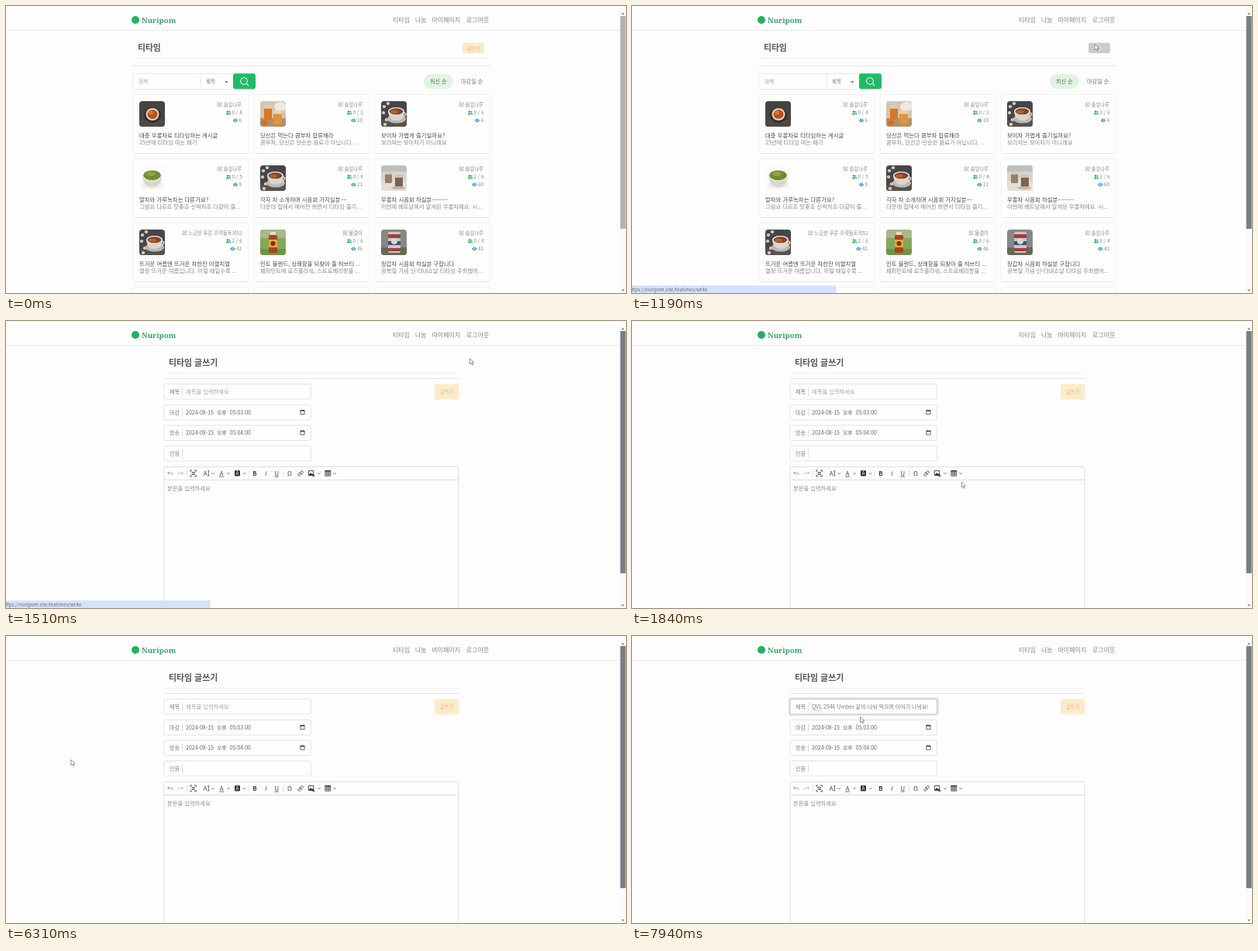
These frames come from a looping animation (800 by 371 pixels, 8000 ms). An HTML page:

```html
<!DOCTYPE html>
<html lang="ko">
<head>
<meta charset="utf-8">
<title>티타임</title>
<style>
html, body { margin: 0; width: 100%; height: 100%; overflow: hidden; background: #fdfdfd; }
svg { display: block; width: 100vw; height: 100vh; }
text { font-family: "Noto Sans CJK KR", "Noto Sans CJK", "Noto Sans", sans-serif; white-space: pre; }
.brand { font-family: "Noto Serif", serif; font-weight: 700; }
</style>
</head>
<body>
<svg id="stage" viewBox="0 0 800 371"></svg>
<script>
const LOOP = 8000;
const FONT = '"Noto Sans CJK KR", "Noto Sans CJK", "Noto Sans", sans-serif';
const pen = document.createElement('canvas').getContext('2d');

function widthOf(str, size) {
  pen.font = `${size * 10}px ${FONT}`;
  return pen.measureText(str).width / 10;
}
const text = (x, y, str, size, fill, extra = '') =>
  `<text x="${x}" y="${y}" font-size="${size}" fill="${fill}" ${extra}>${str}</text>`;
const rect = (x, y, w, h, fill, r = 0, extra = '') =>
  `<rect x="${x}" y="${y}" width="${w}" height="${h}" rx="${r}" fill="${fill}" ${extra}/>`;
const box = (x, y, w, h, r = 2, stroke = '#dedede') =>
  rect(x + .5, y + .5, w - 1, h - 1, '#fefefe', r, `stroke="${stroke}" stroke-width=".8"`);
const line = (d, stroke, width = .8, extra = '') =>
  `<path d="${d}" fill="none" stroke="${stroke}" stroke-width="${width}" ${extra}/>`;
const disc = (x, y, rx, ry, fill) => `<ellipse cx="${x}" cy="${y}" rx="${rx}" ry="${ry}" fill="${fill}"/>`;
const fill = (d, color) => `<path d="${d}" fill="${color}"/>`;
const at = (x, y, body, extra = '') => `<g transform="translate(${x} ${y})" ${extra}>${body}</g>`;

// Thumbnails, each 33 by 33
const daisies = [[4, 7], [9, 3], [3, 15], [7, 24], [5, 30]]
  .map(([x, y]) => disc(x, y, 2.2, 2, '#d9d6ca') + disc(x, y, .8, .8, '#d9b548')).join('');
const glass = (x, y, w, h, tone) =>
  rect(x, y, w, h, tone, 1.5) + rect(x, y, w, h * .25, '#efe4d6', 1, 'opacity=".75"');
const thumbs = {
  oolong: rect(0, 0, 33, 33, '#47433f') + rect(0, 24, 33, 9, '#4f4741') +
    disc(17, 18, 11, 10, '#30302f') + disc(17, 17, 8.5, 8, '#e2d8cd') +
    disc(17, 17, 6.6, 6.1, '#b9521f') + disc(15, 15, 3, 2.5, '#d8783d'),
  kombucha: rect(0, 0, 33, 33, '#d3c6b6') + rect(0, 22, 33, 11, '#b58e68') + disc(26, 7, 8, 6, '#eee9e1') +
    glass(5, 5, 10, 19, '#d57a22') + glass(17, 12, 11, 18, '#e0933a') + disc(6, 28, 4, 3, '#d66c1f'),
  cup: rect(0, 0, 33, 33, '#45464a') + rect(0, 25, 33, 8, '#55524f') + daisies +
    disc(20, 23, 12, 5.5, '#bdb9b3') + fill('M9 13Q10 25 20 25Q30 25 30 13Z', '#d9d5cf') +
    disc(19.5, 13, 10.5, 5, '#efebe5') + disc(19.5, 13.3, 8.9, 4, '#8a4222') +
    disc(17, 13.8, 5, 2, '#b4622f') + line('M29 15Q35 16 28 21', '#d5d0ca', 1.6),
  matcha: rect(0, 0, 33, 33, '#fbfbf9') + disc(17, 25, 14, 5, '#eeeeeb') +
    fill('M4 14Q6 28 17 28Q28 28 29 14Z', '#d5d8ca') + disc(16.5, 14, 12.5, 7, '#e3e6d9') +
    disc(16.5, 12.8, 11.3, 6.4, '#718d2b') + disc(15, 11, 6, 3, '#8da643'),
  latte: rect(0, 0, 33, 33, '#d6d4d0') + rect(0, 20, 33, 13, '#e3dfd9') + rect(0, 0, 33, 8, '#bfc0bb') +
    glass(5, 8, 9, 15, '#9a7f62') + glass(18, 12, 10, 16, '#7b634d') + disc(22, 29, 9, 2, '#c4b7a8'),
  bottle: rect(0, 0, 33, 33, '#83a858') + rect(0, 0, 33, 11, '#a9b889') + rect(0, 25, 33, 8, '#6e9547') +
    rect(13, 3, 7, 5, '#e8ddcb', 1) + rect(11, 7, 11, 23, '#a9441d', 2) +
    rect(11, 13, 11, 10, '#e5a63c') + disc(16.5, 18, 3, 3, '#793019'),
  pack: rect(0, 0, 33, 33, '#858983') + rect(0, 23, 33, 10, '#626956') + rect(9, 3, 16, 27, '#c9c8ca', 2) +
    rect(9, 6, 16, 5, '#a83c39') + rect(9, 15, 16, 5, '#3b5080') + rect(9, 24, 16, 4, '#a83c39') +
    disc(17, 15, 4, 4, '#ddd7d0')
};

// Small symbols, each about 6 by 6
const edit = line('M3.2 .8H.6V5.6H5.2V3.3M2.2 4L2.5 2.8L5 .3L5.9 1.2L3.4 3.7Z', '#888', .6);
const people = disc(2.2, 1.6, 1.3, 1.3, '#26a766') + disc(4.7, 1.8, 1, 1, '#26a766') +
  fill('M0 5.4Q0 3.3 2.2 3.3Q4.2 3.3 4.3 5.4ZM4.7 5.4Q4.7 4 4 3.4Q6.4 3 6.5 5.4Z', '#26a766');
const eye = fill('M0 3Q3.2 -1.6 6.4 3Q3.2 7.6 0 3Z', '#2f97e6') +
  disc(3.2, 3, 1.4, 1.4, '#fff') + disc(3.2, 3, .9, .9, '#2f97e6');
const calendar = line('M.4 1.2H5.6V6H.4ZM1.6 0V1M4.4 0V1', '#333', .7) + rect(.2, .9, 5.6, 1.2, '#333');
const chevron = x => line(`M${x - 1.7} 196.2l1.7 1.7l1.7 -1.7`, '#555', .8);

const WRITER = '솔잎나루';
const posts = [
  ['oolong', '대충 우롱차로 티타임하는 게시글', '25년에 티타임 여는 패기', '0 / 4', 6],
  ['kombucha', '당신은 먹는다 콤부차 합류해라', '콤부차, 당신은 단순한 음료가 아닙니다. ...', '0 / 2', 10],
  ['cup', '보이차 가볍게 즐기실까요?', '보리차는 보이차가 아니래요', '0 / 6', 4],
  ['matcha', '말차와 가루녹차는 다른가요?', '그럼요 다르죠 맛좋죠 신박하죠 다같이 즐...', '0 / 5', 9],
  ['cup', '각자 차 소개하며 시음회 가지실분~~', '더운데 집에서 에어컨 쐬면서 티타임 즐기...', '0 / 4', 21],
  ['latte', '우롱차 시음회 하실분~~~~~', '이번에 베트남에서 알게된 우롱차에요. 시...', '2 / 6', 60],
  ['cup', '뜨거운 여름엔 뜨거운 차한잔 이열치열', '열정 뜨거운 여름입니다. 이럴 때일수록 ...', '2 / 6', 42, '느긋한 푸른 조약돌토끼52'],
  ['bottle', '민트 블렌드, 상쾌함을 되찾아 줄 허브티 ...', '페퍼민트에 로즈플라워, 스트로베리향을 ...', '0 / 6', 46, '물결이'],
  ['pack', '장갑차 시음회 하실분 구합니다', '광복절 기념 인-터내쇼날 티타임 주최했어...', '0 / 4', 41]
];

function meta(y, str, icon) {
  const size = 6.4, x = 140 - widthOf(str, size);
  return text(x, y, str, size, '#888') + at(x - 7.7, y - 5.4, icon);
}

const frame = box(-.5, -1, 150, 77, 3, '#efefef') + line('M2 75.5H147', '#e2e2e2');

function card([thumb, title, desc, seats, views, writer = WRITER], i) {
  const body = frame +
    at(8, 8, thumbs[thumb], 'clip-path="url(#round)"') +
    meta(14.6, writer, edit) + meta(25.3, seats, people) + meta(35.3, String(views), eye) +
    text(8, 54.5, title, 7.4, '#4c4c4c', 'font-weight="500"') + text(8, 64.4, desc, 7.3, '#888');
  return at(164 + i % 3 * 156, 115 + Math.floor(i / 3) * 83, body);
}

function listPage() {
  const nextRow = [0, 1, 2].map(i => at(164 + i * 156, 364, frame)).join('');
  return text(170, 58, '티타임', 10.8, '#555', 'font-weight="700"') +
    line('M167 67.5H621', '#eeeeee') + line('M163 77.5H625', '#e2e2e2') +
    rect(589, 47.5, 28, 13.5, '#fbe9c8', 3, 'id="writeBtn"') +
    text(603, 56.6, '글쓰기', 6, '#e3b06a', 'id="writeText" text-anchor="middle"') +
    box(163, 87, 159, 21, 3, '#e6e6e6') + line('M251.5 88V107', '#e6e6e6') +
    text(171, 100, '검색', 6.6, '#999') + text(258, 100, '제목', 6.4, '#777') +
    fill('M282.3 97.2h4l-2 2.2z', '#555') +
    rect(293, 87.3, 29, 20, '#22bb64', 3) +
    '<circle cx="307" cy="97" r="4.4" fill="none" stroke="#fff"/>' + line('M310.2 100.2L313 103', '#fff', 1.1) +
    rect(539, 88, 38, 19, '#e1f4df', 9) +
    text(547, 100.2, '최신 순', 7.2, '#666') + text(587, 100.2, '마감일 순', 7.2, '#777') +
    posts.map(card).join('') + nextRow;
}

function field(y, label, value = '', dated = false) {
  return box(203.5, y, 190.5, 20.5) + text(211, y + 12.8, label, 7, '#777') +
    line(`M227.5 ${y + 5}V${y + 16}`, '#d5d5d5') + value +
    (dated ? at(379.5, y + 6.5, calendar) : '');
}

function toolbar() {
  const mark = (x, str, extra = '', color = '#444') =>
    text(x, 199.9, str, 7.8, color, `text-anchor="middle" ${extra}`);
  return line('M210.5 194.5L208.5 196.5L210.5 198.5M208.7 196.5H213.5Q215.3 196.6 215.2 199', '#999', .9) +
    line('M226.5 194.5L228.5 196.5L226.5 198.5M228.3 196.5H223.5Q221.7 196.6 221.8 199', '#bbb', .9) +
    line('M233.5 192.5V201.5M313.5 192.5V201.5M357.5 192.5V201.5', '#ddd') +
    line('M238 195V193H240M243 193H245.4V195M245.4 199V201H243M240 201H238V199', '#444', .9) +
    line('M239.5 195.5H244M239.5 197H244M239.5 198.5H244', '#444', .8) +
    mark(257.2, 'A') + line('M261.3 193.8V200M260.2 193.8H262.4M260.2 200H262.4', '#444', .8) + chevron(267) +
    mark(278, 'A') + line('M275 201.2H281', '#777', 1) + chevron(287) +
    rect(295, 193.2, 7, 7.2, '#2f2f2f', .8) + text(298.5, 199.2, 'A', 6.4, '#fff', 'text-anchor="middle"') + chevron(307.5) +
    mark(321, 'B', 'font-weight="900"', '#333') + mark(335, 'I', 'font-style="italic"') +
    mark(349.3, 'U') + line('M346.5 201.2H352', '#555') +
    mark(366, 'Ω') +
    at(380, 197, '<g transform="rotate(-45)">' + rect(-4, -1.5, 4.6, 3, 'none', 1.5, 'stroke="#555" stroke-width=".9"') +
      rect(-.6, -1.5, 4.6, 3, 'none', 1.5, 'stroke="#555" stroke-width=".9"') + '</g>') +
    line('M390.3 193.6H396.8V199.5H390.3Z', '#333', .9) + fill('M390.5 199.5L393 196L395 198L396 197L397 199.5Z', '#333') +
    line('M396.8 198V202M394.8 200H398.8', '#333') + chevron(404) +
    line('M411.8 193.7H418.8V200.3H411.8ZM411.8 196H418.8M411.8 198.2H418.8M414.2 193.7V200.3M416.5 193.7V200.3', '#444', .8) +
    rect(411.5, 193.2, 7.6, 1.4, '#333') + chevron(424);
}

function writePage() {
  const size = 7, brand = 'QVL';
  const typed = text(232, 93.9, brand + ' 2946 Umber 같이 나눠 먹으며 이야기 나눠요!', size, '#777') +
    line(`M232 95.8H${232 + widthOf(brand, size)}`, '#e7a08c', .6);
  const date = (y, s) => text(232, y, s, size, '#666', 'word-spacing="2"');
  return text(210, 58, '티타임 글쓰기', 10.9, '#555', 'font-weight="700"') +
    line('M207 67.5H583', '#eeeeee') + line('M203.5 74.5H585', '#e2e2e2') +
    rect(201.5, 79, 195, 24.5, '#e9e9e9', 4, 'id="ring"') +
    field(81, '제목', `<g id="hint">${text(232, 93.9, '제목을 입력하세요', 7.3, '#a5a5a5')}</g><g id="typed">${typed}</g>`) +
    rect(203.9, 81.4, 189.7, 19.7, 'none', 2, 'id="edge" stroke="#bcbcbc" stroke-width=".8"') +
    field(108, '마감', date(120.9, '2024-08-15 오후 05:03:00'), true) +
    field(134.5, '방송', date(147.4, '2024-08-15 오후 05:04:00'), true) +
    field(161, '인원') +
    rect(553, 81.5, 31.5, 20, '#fcebcb', 3) +
    text(568.7, 93.9, '글쓰기', 6.3, '#e2b677', 'text-anchor="middle"') +
    box(203.5, 188, 381, 200, 1, '#d9d9d9') + line('M204 205.5H584', '#d5d5d5') + toolbar() +
    text(208, 219, '본문을 입력하세요', 7.3, '#8d8d8d');
}

const nav = [[499, '티타임'], [528, '나눔'], [549.5, '마이페이지'], [594, '로그아웃']]
  .map(([x, s]) => text(x, 20.8, s, 8, '#888')).join('');

document.getElementById('stage').innerHTML =
  '<defs><clipPath id="round"><rect width="33" height="33" rx="4"/></clipPath></defs>' +
  rect(0, 0, 800, 371, '#fdfdfd') +
  '<circle cx="167" cy="18" r="5" fill="#25b062"/>' +
  text(175, 21.7, 'Nuripom', 9.7, '#3aa266', 'class="brand"') + nav +
  line('M0 31.5H792', '#e8e8e8') +
  `<g id="list">${listPage()}</g><g id="write">${writePage()}</g>` +
  rect(792, 0, 8, 371, '#fafafa') + rect(792.6, 13, 7, 275, '#757e88', .5, 'id="thumb"') +
  fill('M794 11h4l-2 -2.5zM794 366.5h4l-2 2.5z', '#888') +
  `<g id="status">${rect(0, 361.3, 263.5, 10, '#d3e3fd') +
    text(-.5, 368.8, 'ttps://nuripom.site/teatimes/write', 6.1, '#666')}</g>` +
  `<g id="beam">${line('M-1.5 -4H1.5M0 -4V4M-1.5 4H1.5', '#777', .8)}</g>` +
  `<path id="arrow" d="M0 0V7.4L1.8 5.9L3 8.5L4.2 7.9L3 5.4H5.3Z" fill="#fff" stroke="#666" stroke-width=".7"/>`;

const el = id => document.getElementById(id);
const show = (id, on) => el(id).setAttribute('visibility', on ? 'inherit' : 'hidden');
const set = (id, key, value) => el(id).setAttribute(key, value);

// Pointer tracks: [time, x, y]
const tracks = [
  [[130, 797, 150], [400, 690, 84], [790, 579, 48], [920, 588, 50], [1050, 596, 50], [1400, 598.5, 48.5],
    [1640, 598.5, 48.5], [1780, 548, 122], [1840, 428, 206], [1910, 240, 330], [1979, 120, 380]],
  [[6310, 83.5, 160], [6450, 130, 138], [6600, 230, 100], [6710, 258, 90], [7530, 258, 90], [7940, 294.5, 104.5], [8001, 294.5, 104.5]]
];

function pointer(t) {
  const track = tracks.find(k => t >= k[0][0] && t < k[k.length - 1][0]);
  if (!track) return null;
  const i = track.findIndex(k => k[0] > t);
  const [t0, x0, y0] = track[i - 1], [t1, x1, y1] = track[i];
  const p = (t - t0) / (t1 - t0);
  return [x0 + (x1 - x0) * p, y0 + (y1 - y0) * p];
}

function draw(t) {
  const writing = t >= 1510, hover = t >= 1050, focus = t >= 7130, pasted = t >= 7530;
  const away = t < 130 || (t >= 1980 && t < 6310);
  show('list', !writing);
  show('write', writing);
  set('writeBtn', 'fill', hover ? '#cfcbc8' : '#fbe9c8');
  set('writeText', 'fill', hover ? '#e6d3bd' : '#e3b06a');
  show('status', hover && t < 1840);
  set('thumb', 'height', writing ? 313 : 275);
  set('thumb', 'fill', away ? '#afb2b5' : '#757e88');
  show('ring', focus);
  show('edge', focus);
  show('hint', writing && !pasted);
  show('typed', pasted);

  const pos = pointer(t);
  const inField = pos && t >= 6690 && pos[1] < 101;
  show('arrow', pos && !inField);
  show('beam', inField);
  if (pos) set(inField ? 'beam' : 'arrow', 'transform', `translate(${pos[0]} ${pos[1]})`);
}

const start = performance.now();
function tick() {
  draw((performance.now() - start) % LOOP);
  requestAnimationFrame(tick);
}
tick();
</script>
</body>
</html>
```
